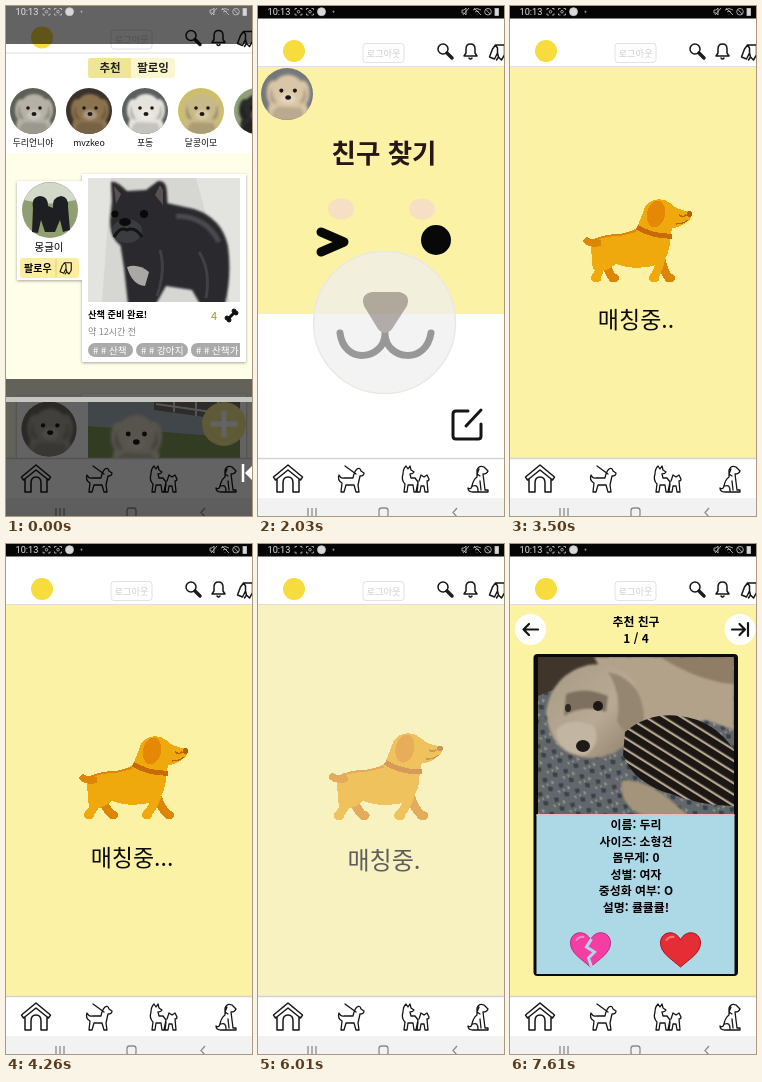
Animation, 246 px wide and 510 px high, one loop 7.68 s. Source, as an HTML page:

```html
<!DOCTYPE html>
<html lang="ko">
<head>
<meta charset="utf-8">
<title>친구 찾기</title>
<style>
html, body { margin: 0; width: 100%; height: 100%; overflow: hidden; background: #fff; }
svg { display: block; width: 100vw; height: 100vh; }
text { font-family: "Noto Sans CJK KR", "Noto Sans CJK", "Noto Sans CJK JP", sans-serif; }
.mid { text-anchor: middle; }
.bold { font-weight: 700; }
.line { fill: none; stroke: #151515; stroke-width: 1.5; stroke-linecap: round; stroke-linejoin: round; }
.page { transform-box: view-box; transform-origin: 126px 257px; }
</style>
</head>
<body>
<svg viewBox="0 0 246 510" preserveAspectRatio="none">
<defs>
  <filter id="shadow" x="-10%" y="-10%" width="120%" height="120%">
    <feDropShadow dx="0" dy="1" stdDeviation="1.6" flood-opacity=".35"/>
  </filter>
  <filter id="soft"><feGaussianBlur stdDeviation="1.2"/></filter>
  <clipPath id="disc"><circle r="23"/></clipPath>
  <clipPath id="post"><rect x="82" y="172" width="152" height="124"/></clipPath>
  <clipPath id="post2"><rect x="82" y="392" width="152" height="60"/></clipPath>
  <clipPath id="portrait"><rect x="28" y="113" width="196" height="158"/></clipPath>
  <pattern id="blanket" width="17" height="15" patternUnits="userSpaceOnUse" patternTransform="rotate(18)">
    <rect width="17" height="15" fill="#62676b"/>
    <path d="M1 3l4-2 2 3-3 3zM9 9l5-1 1 4-4 1z" fill="#3b4149"/>
    <path d="M10 2l4 1-2 3zM2 10l3-1 1 3zM7 7l2-1v3z" fill="#97938b"/>
  </pattern>
  <pattern id="stripes" width="9.500" height="10" patternUnits="userSpaceOnUse" patternTransform="rotate(-58)">
    <rect width="9.500" height="10" fill="#1b1715"/><rect width="2.200" height="10" fill="#b5a78f"/>
  </pattern>
  <linearGradient id="fur" x2="1" y2="1">
    <stop stop-color="#a79a86"/><stop offset=".55" stop-color="#b8aa94"/><stop offset="1" stop-color="#8a7c69"/>
  </linearGradient>
  <!-- Fluffy dog face in a disc; fur takes the current colour -->
  <g id="fluffy" clip-path="url(#disc)">
    <g filter="url(#soft)">
      <path d="M-15 24Q-20 8-10 4H12Q22 12 18 24Z" fill="currentColor"/>
      <path d="M-13 24Q-15 14-8 11L12 12Q16 16 14 24Z" fill="#000" opacity=".14"/>
      <ellipse cx="-12" cy="-1" rx="6" ry="11" fill="currentColor"/>
      <ellipse cx="14" cy="-1" rx="6" ry="11" fill="currentColor"/>
      <path d="M-14-6Q-18 8-9 9Q-12 0-14-6ZM16-6Q20 8 11 9Q14 0 16-6Z" fill="#000" opacity=".2"/>
      <circle cx="1" cy="-3" r="14" fill="currentColor"/>
      <ellipse cx="1" cy="4" rx="7" ry="5" fill="#fff" opacity=".25"/>
    </g>
    <circle cx="-5" cy="-3" r="1.800" fill="#1d1815"/><circle cx="7" cy="-3" r="1.800" fill="#1d1815"/>
    <ellipse cx="1" cy="3" rx="2.500" ry="2" fill="#1d1815"/>
  </g>
  <path id="pugs" d="M-18 22L-17-2Q-19-13-10-14Q-2-14-2-4L3-2Q2-13 11-14Q19-13 18-3L20 20L13 22L10 10L5 22H-5L-9 10L-12 23Z" fill="#1e1f22"/>
  <path id="heart" d="M0 17C-9 9-20 3-20-7C-20-19-5-21 0-10C5-21 20-19 20-7C20 3 9 9 0 17Z"/>
  <path id="dogHead" d="M-2-7H7V3L4 8L1 5L0 1V-4L-2-7L-5-3L-8 5L-3 7L0 1M1 5L-1 8"/>
</defs>

<rect width="246" height="510" fill="#f2f2f2"/>

<g id="feed">
  <rect width="246" height="510" fill="#fffee9"/>
  <rect width="246" height="147" fill="#fff"/>
  <rect x="82" y="52" width="87" height="20" rx="3" fill="#faf6ce"/>
  <path d="M85 52H125V72H85Q82 72 82 69V55Q82 52 85 52Z" fill="#eee695"/>
  <g class="mid bold" font-size="11.5" fill="#222"><text x="104" y="66">추천</text><text x="147" y="66">팔로잉</text></g>
  <g id="stories"></g>
  <g fill="#fff" filter="url(#shadow)">
    <rect x="11" y="175" width="65" height="99"/><rect x="76" y="168" width="164" height="188"/>
    <rect x="11" y="390" width="65" height="99"/><rect x="76" y="388" width="164" height="120"/>
  </g>
  <g transform="translate(44 204)">
    <circle r="28" fill="#8f9f72"/>
    <path d="M-26-10A28 28 0 0 1 26-10Q0-3-26-10Z" fill="#d3d9c9"/>
    <use href="#pugs"/>
  </g>
  <text class="mid" x="43" y="245" font-size="10.5">몽글이</text>
  <rect x="14" y="252" width="59" height="20" rx="3" fill="#fbeea0"/>
  <text class="bold" x="18" y="266" font-size="10">팔로우</text>
  <path d="M50 253V271" stroke="#ddd083"/>
  <use href="#dogHead" class="line" transform="translate(60 262) scale(.75)"/>
  <g clip-path="url(#post)">
    <rect x="82" y="172" width="152" height="124" fill="#d6d6d3"/>
    <path d="M82 172H105L96 296H82ZM190 172H234V296H224Z" fill="#e3e3e0"/>
    <g fill="#2a2b2e" filter="url(#soft)">
      <path d="M113 230L118 262L122 298H150L160 280L186 284L194 298H219Q226 270 222 240Q216 212 188 203L156 196Z"/>
      <path d="M104 215L106 195L105 176Q110 174 121 185L140 184L152 175Q161 174 161 188L163 222Q155 245 128 244Q104 241 104 215Z"/>
    </g>
    <path d="M108 180L115 188L110 198ZM154 179L157 184L157 199L149 189Z" fill="#5b5152"/>
    <path d="M170 210Q200 210 213 236" fill="none" stroke="#4b4c50" stroke-width="5" filter="url(#soft)"/>
    <ellipse cx="121" cy="225" rx="15" ry="12" fill="#3b3c3f"/>
    <path d="M108 231Q114 220 121 224Q129 220 136 231" fill="none" stroke="#141414" stroke-width="3"/>
    <ellipse cx="119" cy="216" rx="6" ry="4" fill="#0b0b0c"/>
    <circle cx="109" cy="208" r="3.500" fill="#090909"/><circle cx="138" cy="208" r="4" fill="#090909"/>
    <path d="M121 261Q132 257 143 266L139 280Q126 279 121 261Z" fill="#a9a8a5"/>
    <path d="M154 244Q160 264 151 290M193 246Q205 264 200 292" fill="none" stroke="#404145" stroke-width="3"/>
  </g>
  <text class="bold" x="82" y="312" font-size="9.2">산책 준비 완료!</text>
  <text x="205" y="314" font-size="11" fill="#a0932c">4</text>
  <g stroke="#111" fill="#111"><path d="M222 313L229 306" stroke-width="3"/>
    <circle cx="221" cy="312" r="2"/><circle cx="223" cy="314" r="2"/><circle cx="228" cy="305" r="2"/><circle cx="230" cy="307" r="2"/></g>
  <text x="82" y="329" font-size="9" fill="#888">약 12시간 전</text>
  <g fill="#aaa"><rect x="82" y="337" width="45" height="14" rx="7"/><rect x="130" y="337" width="52" height="14" rx="7"/>
    <path d="M192 337H234V351H192Q185 351 185 344Q185 337 192 337Z"/></g>
  <g font-size="9.6" fill="#fff"><text x="87" y="347.5"># # 산책</text><text x="135" y="347.5"># # 강아지</text><text x="190" y="347.5"># # 산책가</text></g>
  <g transform="translate(43 423) scale(1.2)" color="#aaa59d"><circle r="23" fill="#6d6962"/><use href="#fluffy"/></g>
  <g clip-path="url(#post2)">
    <rect x="82" y="392" width="152" height="60" fill="#a9b5c0"/>
    <path d="M82 420L234 432V452H82Z" fill="#7f9a58"/><path d="M148 392H234V416L148 404Z" fill="#77736d"/>
    <path d="M150 398L234 410M168 392V406M190 392V410M212 392V413" stroke="#ddd" stroke-width="2"/>
    <g transform="translate(129 432) scale(1.35)" color="#e0d8c6"><use href="#fluffy"/></g>
  </g>
  <circle cx="218" cy="418" r="22" fill="#f3e88f"/>
  <path d="M218 405V431M205 418H231" stroke="#fff" stroke-width="5"/>
</g>

<g id="friend" class="page">
  <rect y="60" width="246" height="393" fill="#fff"/><rect y="60" width="246" height="248" fill="#fbf2a5"/>
  <g transform="translate(29 88) scale(1.13)" color="#d9c6a6"><circle r="23" fill="#74787c"/><use href="#fluffy"/></g>
  <text class="mid bold" x="126" y="157" font-size="26.5" fill="#281815">친구 찾기</text>
  <g fill="#f6dfc3"><ellipse cx="83" cy="203" rx="13" ry="10.5"/><ellipse cx="164" cy="203" rx="13" ry="10.5"/></g>
  <path class="line" d="M63 226L86 236L63 246" style="stroke:#080808;stroke-width:9"/>
  <circle cx="178" cy="234" r="15" fill="#080808"/>
  <circle cx="126.500" cy="316.500" r="71" fill="#efefef" fill-opacity=".75" stroke="#e9e9e4" stroke-width="1.5"/>
  <g id="muzzle">
    <path class="line" d="M127 322V329C125 354 86 359 82 327M127 329C129 354 168 359 173 327" style="stroke:#111;stroke-width:7"/>
    <path d="M114 286H141Q153 288 149 300L134 323Q127 331 120 323L106 300Q102 288 114 286Z" fill="#50413c"/>
  </g>
  <path class="line" d="M210 405H198Q195 405 195 408V430Q195 433 198 433H220Q223 433 223 430V418M208 420L223 404" style="stroke-width:3"/>
</g>

<g id="match" class="page">
  <rect y="60" width="246" height="393" fill="#fbf2a5"/>
  <g id="dog" shape-rendering="crispEdges">
    <g id="legs" fill="none" stroke-width="8.500" stroke-linecap="round" stroke-linejoin="round"></g>
    <path d="M85 232C95 227 115 229 127 221L135 200C140 191 153 190 160 196C166 202 174 204 181 205Q183 210 178 214Q170 221 162 221L160 232C160 243 157 252 150 257C134 263 116 261 106 257Q100 262 94 264L84 263Q81 257 82 249Q80 245 81 240Z" fill="#efa90d"/>
    <path d="M82 234Q94 228 110 228L126 224" fill="none" stroke="#dd8507" stroke-width="2"/>
    <path d="M77 234Q81 237 88 236" fill="none" stroke="#dd8507" stroke-width="7" stroke-linecap="round"/>
    <path d="M127 220Q143 230 162 229" fill="none" stroke="#c76b08" stroke-width="5"/>
    <ellipse cx="146" cy="207" rx="9" ry="13.500" fill="#e48806" transform="rotate(12 146 207)"/>
    <path d="M169 208Q173 211 176 208" fill="none" stroke="#b5650a" stroke-width="1.5"/>
    <circle cx="179.500" cy="207" r="2.7" fill="#b85f08"/>
    <path d="M166 217Q174 217 178 213" fill="none" stroke="#b5650a" stroke-width="1.2"/>
  </g>
  <text id="status" class="mid" x="126" y="322" font-size="23" fill="#0b0b0b"></text>
</g>

<g id="result" class="page">
  <rect y="60" width="246" height="393" fill="#fbf2a2"/>
  <circle cx="20.500" cy="85.500" r="15.500" fill="#fff"/><circle cx="230" cy="85.500" r="15.500" fill="#fff"/>
  <path class="line" d="M28 85.500H13.500M19 80L13.500 85.500L19 91M222 85.500H235M229.500 80L235 85.500L229.500 91M238 79V92" style="stroke-width:2.200"/>
  <g class="mid bold" font-size="11.9">
    <text x="126" y="82">추천 친구</text><text x="126" y="99">1 / 4</text>
    <g id="facts"></g>
  </g>
  <rect x="23.500" y="110" width="204.500" height="322" rx="4" fill="#0b0b0b"/>
  <rect x="26.500" y="271" width="198" height="159" fill="#add8e6"/>
  <g clip-path="url(#portrait)">
    <rect x="28" y="113" width="196" height="158" fill="url(#blanket)"/>
    <path d="M28 113H100L70 135L28 152Z" fill="#40352b"/>
    <g filter="url(#soft)">
      <path d="M84 113H224V186L196 176L169 182L120 176Z" fill="#b3a28a"/>
      <path d="M150 113H224V140Q190 138 150 113Z" fill="#8f7d66"/>
      <path d="M36 168Q42 130 78 121Q112 116 128 145Q138 172 124 192Q108 214 80 214Q40 212 36 168Z" fill="url(#fur)"/>
      <path d="M98 128Q136 136 134 182Q118 198 107 177Q112 150 98 128Z" fill="#94866f"/>
      <path d="M46 186Q60 172 84 182Q92 200 75 211Q48 210 46 186Z" fill="#c2b5a2"/>
      <path d="M56 150Q76 142 98 152L96 168Q74 160 54 172Z" fill="#7d705f"/>
      <path d="M112 236Q136 236 158 254L178 271H132Q108 260 112 236Z" fill="#a4947c"/>
    </g>
    <path d="M115 188Q139 168 170 172Q204 176 224 206V262Q191 262 161 250Q124 240 113 211Z" fill="url(#stripes)"/>
    <circle cx="88" cy="162" r="5" fill="#1d1817"/><ellipse cx="58" cy="164" rx="3" ry="4" fill="#30271f"/>
    <ellipse cx="73" cy="202" rx="7" ry="6" fill="#1f1a1a"/>
  </g>
  <rect x="26.500" y="270" width="198" height="2" fill="#f3b7bf"/>
  <g transform="translate(80.500 406)">
    <use href="#heart" fill="#f53da4" stroke="#b32f7d"/>
    <path d="M1-11L-4-3L4 2L-2 8L1 17" fill="none" stroke="#add8e6" stroke-width="3"/>
    <path d="M-14-10Q-11-14-7-13" fill="none" stroke="#ff8cc8" stroke-width="2" stroke-linecap="round"/>
  </g>
  <g transform="translate(170.500 406)">
    <use href="#heart" fill="#e52d35" stroke="#a9151d"/>
    <path d="M-14-10Q-11-14-7-13" fill="none" stroke="#fb7775" stroke-width="2" stroke-linecap="round"/>
  </g>
</g>

<g id="header">
  <rect width="246" height="60" fill="#fff"/><path d="M0 60.500H246" stroke="#dedede"/>
  <circle cx="36" cy="45" r="11" fill="#f6dc3d"/>
  <rect x="105" y="37.500" width="41" height="19" rx="3" fill="#fff" stroke="#e2e2e2"/>
  <text class="mid" x="125.500" y="50.500" font-size="9.3" fill="#d0d0d0">로그아웃</text>
  <path d="M189 47L194 52" stroke="#201a18" stroke-width="3.500" stroke-linecap="round"/>
  <circle cx="185" cy="43" r="5" class="line"/>
  <path class="line" d="M206 50H219L217 47V43Q217 38 212.500 38Q208 38 208 43V47ZM211 52Q212.500 54 214 52"/>
  <use href="#dogHead" class="line" x="239.500" y="46"/>
</g>

<g id="tabs">
  <rect y="452" width="246" height="40" fill="#fff"/><path d="M0 452.500H246" stroke="#d4d4d4" stroke-width="1.5"/>
  <g class="line">
    <path d="M15.500 471L30 459L44.500 471L42.500 474L30 464L17.500 474ZM19 473V486H25V477Q25 471 30 471Q35 471 35 477V486H41V473"/>
    <g stroke-width="1.300">
      <path d="M87 460L98 468M99 463Q102 461 103 465L106 467Q106 470 102 470L100 479L101 486H98L96 479H88L86 486H83L84 477Q79 474 81 469Q83 473 86 472H95Q96 466 99 463Z"/>
      <path d="M148 460L150 463L152 460L153 464L156 466Q155 468 152 468L153 472H157L160 476L158 486H156L155 479H150L149 486H146L147 478Q143 474 145 468Q145 463 148 460ZM163 469L166 471L169 469L171 473Q171 475 169 475L170 486H167L166 480H163L162 486H159L160 478M163 469L161 475"/>
      <path d="M219 464Q221 459 226 461L230 465Q229 468 225 468L226 476L227 484H230V486H215Q210 486 210 482Q213 484 214 480Q215 474 219 471ZM221 463L219 468L222 470M222 475L223 484M215 480Q220 478 220 485"/>
    </g>
  </g>
  <rect y="492" width="246" height="18" fill="#f2f2f2"/>
  <g fill="none" stroke="#8b8b8b" stroke-width="1.3"><path d="M50 502V511M54 502V511M58 502V511M199 502L195 506.500L199 511"/><rect x="121" y="502" width="9" height="9" rx="2.500"/></g>
</g>

<rect id="statusBar" width="246" height="12.500" fill="#050505"/>
<g id="playerShade">
  <path d="M0 0H246V38H0ZM0 373H246V510H0Z" opacity=".61"/>
  <rect y="391" width="246" height="5" fill="#c7c7c2"/>
  <path d="M237 458V476" stroke="#fff" stroke-width="2.500"/><path d="M239 467L246 460V474Z" fill="#fff"/>
</g>
<g fill="none" stroke="#c8c8c8" stroke-width=".8">
  <text x="9.500" y="9" font-size="9.2" fill="#e4e4e4" stroke="none" style="font-family:Roboto,sans-serif">10:13</text>
  <path id="scan" d="M37 4V2.500H39M42 2.500H44V4M37 7.500V9H39M42 9H44V7.500"/>
  <circle id="scanDot" cx="40.500" cy="5.700" r="1.3"/>
  <use href="#scan" x="11.500"/><circle cx="52" cy="5.700" r="1.3"/>
  <circle cx="63.500" cy="5.700" r="4" fill="#d8d8d8"/><circle cx="75.500" cy="5.700" r=".6"/>
  <path d="M204 4H206L208 2V9L206 7H204ZM211 2L205 9M215 4Q219 1 223 4M217 6Q219 4 221 6M219 8.500V8M216 2L223 9"/>
  <circle cx="230" cy="5.700" r="3.300"/><path d="M228 3.500L232 8"/><rect x="237" y="2.500" width="3.500" height="7" fill="#d8d8d8"/>
</g>
</svg>
<script>
const LOOP = 7680;
const el = id => document.getElementById(id);
const ramp = (t, from, to) => Math.min(1, Math.max(0, (t - from) / (to - from)));
const show = (id, visible) => { el(id).style.display = visible ? '' : 'none'; };

function setPage(id, opacity, scale) {
  show(id, opacity > 0);
  el(id).style.opacity = opacity;
  el(id).style.transform = scale === 1 ? 'none' : `scale(${scale})`;
}

const stories = [
  ['두리언니야', '#b5b1a6', '#5d6054'], ['mvzkeo', '#8c7350', '#3a332c'], ['포동', '#e6e3dd', '#5b5f60'],
  ['달콩이모', '#c8b988', '#cdbf6a'], ['', '#2a2a2a', '#90a07a']
];
el('stories').innerHTML = stories.map(([name, fur, back], i) => `
  <g transform="translate(${27 + 56 * i} 105)" color="${fur}">
    <circle r="23" fill="${back}"/><use href="#fluffy"/>
    <text class="mid" y="35" font-size="8.8" font-weight="500" fill="#111">${name}</text>
  </g>`).join('');

const facts = ['이름: 두리', '사이즈: 소형견', '몸무게: 0', '성별: 여자', '중성화 여부: O', '설명: 큘큘큘!'];
// Drawn last so the text lies over the card.
el('result').append(el('facts'));
el('facts').setAttribute('class', 'mid bold');
el('facts').setAttribute('font-size', 11.9);
el('facts').innerHTML = facts.map((fact, i) => `<text x="126" y="${285 + 16.5 * i}">${fact}</text>`).join('');

// Opposite legs swing against each other in eight poses per stride.
function drawDog(t) {
  const pose = Math.round((t - 4260) / 874 * 8);
  const swing = Math.cos(pose * Math.PI / 4);
  const leg = (hip, side, color) => {
    const foot = hip + side * swing * 11;
    return `<path d="M${hip} 252Q${hip + side * swing * 4} 264 ${foot} 271h2" stroke="${color}"/>`;
  };
  el('legs').innerHTML = leg(95, 1, '#dd8507') + leg(151, 1, '#dd8507') +
    leg(93, -1, '#efa90d') + leg(151, -1, '#efa90d');
  el('dog').setAttribute('transform', `translate(0 ${2 * (1 - swing * swing)})`);
}

function render(t) {
  const opening = t < 70;
  show('feed', opening);
  show('playerShade', opening);
  show('statusBar', !opening);
  el('header').setAttribute('transform', `translate(0 ${opening ? -13.5 : 0})`);

  const friendOut = ramp(t, 2100, 2240), matchIn = ramp(t, 2100, 2310);
  const matchOut = ramp(t, 5940, 6140), resultIn = ramp(t, 6030, 6230);
  setPage('friend', opening ? 0 : 1 - friendOut, 1 + 0.1 * friendOut);
  setPage('match', matchIn * (1 - matchOut), 0.9 + 0.1 * matchIn + 0.13 * matchOut);
  setPage('result', resultIn, 0.9 + 0.1 * resultIn);

  el('muzzle').style.opacity = 1 - 0.6 * ramp(t, 1740, 1900);
  const tick = Math.max(0, Math.floor((t - 2250) / 1000));
  el('status').textContent = '매칭중' + '.'.repeat(tick % 3 + 1);
  drawDog(t);
  show('scanDot', Math.floor((t - 2030) / 510) % 2 === 0);
}

const start = performance.now();
function frame() {
  render((performance.now() - start) % LOOP);
  requestAnimationFrame(frame);
}
frame();
</script>
</body>
</html>
```
